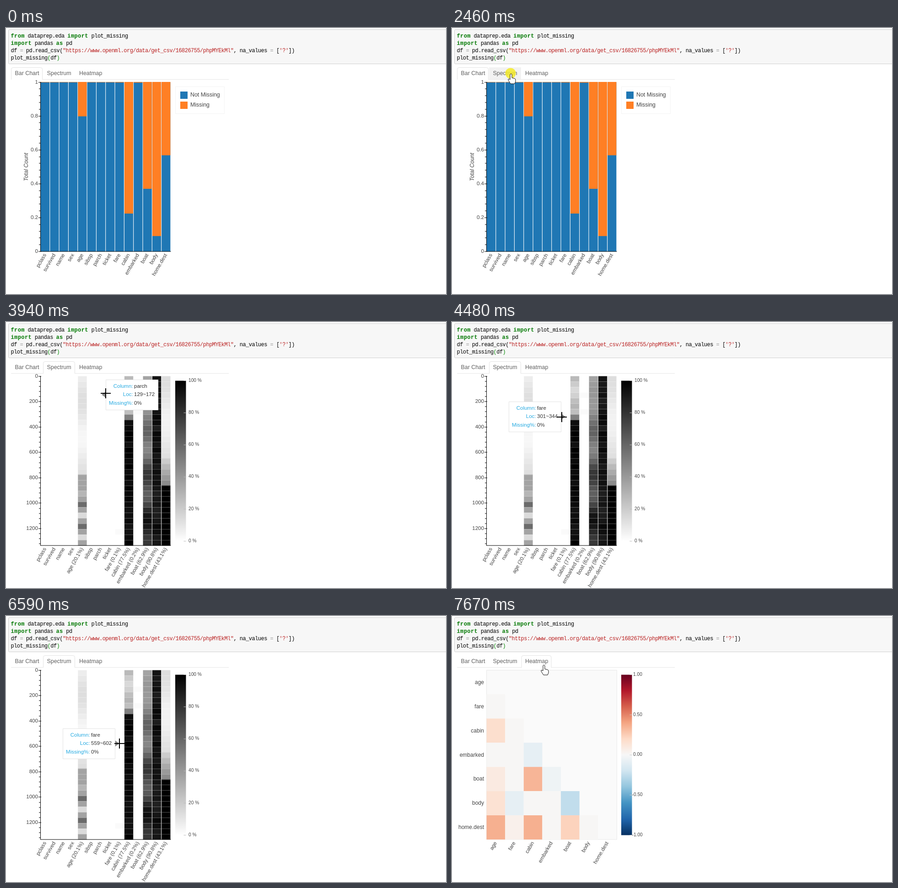
Recreate the animation shown at these times as an HTML page with a canvas. Size 962 by 582 pixels, loop 8000 ms.

```html
<!DOCTYPE html>
<html lang="en">
<head>
<meta charset="utf-8">
<title>Missing values</title>
<style>
html, body { margin: 0; width: 100%; height: 100%; overflow: hidden; background: #fff; }
canvas { display: block; }
</style>
</head>
<body>
<canvas id="stage" width="962" height="582"></canvas>
<script>
const ctx = document.getElementById('stage').getContext('2d');
const LOOP = 8000;
const SANS = '"Liberation Sans", Arial, sans-serif', MONO = '"Liberation Mono", monospace';
const BLUE = '#1f77b4', ORANGE = '#ff7f24';
const PLOT = { x: 75.5, y: 118.5, w: 284.5, h: 370.5 };
const BINS = 31, BIN_SIZE = 43;
const colW = PLOT.w / 14, binH = PLOT.h / BINS;

const columns = ['pclass', 'survived', 'name', 'sex', 'age', 'sibsp', 'parch', 'ticket',
  'fare', 'cabin', 'embarked', 'boat', 'body', 'home.dest'];
const missing = { age: 20.1, fare: 0.1, cabin: 77.5, embarked: 0.2, boat: 62.9, body: 90.8, 'home.dest': 43.1 };

// Percentage missing in each bin of a column
const noise = n => { const v = Math.sin(n * 12.9898) * 43758.5453; return v - Math.floor(v); };
const clamp = v => Math.max(0, Math.min(1, v));
const density = {
  age: i => i < 18 ? 8 + 5 * Math.cos((i - 4) * 0.45)
    : 36 + 22 * Math.cos((i - 23) * Math.PI / 2) * clamp((i - 20) / 3),
  boat: i => 36 + 1.8 * i + Math.min(i, 12) * Math.cos((i - 9) * 0.757),
  cabin: i => i < 7 ? 22 + 7 * Math.cos((i - 5) * 1.1) : i < 8 ? 50 : 92 + 8 * noise(i),
  body: i => 87 + 10 * noise(i + 3),
  'home.dest': i => i < 20 ? 9 + 4 * Math.cos(i * 0.4) + 7 * Math.max(0, i - 14) : 100,
  fare: i => i === 28 ? 2 : 0,
  embarked: i => i === 3 || i === 6 ? 2 : 0
};

// Notable correlations; all other pairs are close to zero
const heatNames = ['age', 'fare', 'cabin', 'embarked', 'boat', 'body', 'home.dest'];
const correlation = {
  cabin: { age: 0.17 },
  embarked: { cabin: -0.09 },
  boat: { age: 0.09, cabin: 0.34, embarked: -0.05 },
  body: { age: 0.15, fare: -0.09, boat: -0.25 },
  'home.dest': { age: 0.36, fare: 0.05, cabin: 0.36, boat: 0.23 }
};
const RDBU = ['#67001f', '#b2182b', '#d6604d', '#f4a582', '#fddbc7', '#f7f7f7',
  '#d1e5f0', '#92c5de', '#4393c3', '#2166ac', '#053061'];

function heatColor(v) {
  const pos = 5 - 5 * v, i = Math.floor(pos);
  return `color-mix(in srgb, ${RDBU[i + 1]} ${(pos - i) * 100}%, ${RDBU[i]})`;
}

const tabs = [['Bar Chart', 11, 69], ['Spectrum', 81, 70], ['Heatmap', 151.5, 66]];

// Pointer moves: start, end, number of steps, from, to, ease-out power
const moves = [
  [70, 840, 11, [900, 560], [296, 34], 1.5],
  [910, 1390, 7, [310, 60], [270, 160]],
  [1850, 2460, 9, [260, 156], [129, 100]],
  [3330, 3715, 6, [146, 104], [210, 128]],
  [3792, 4100, 5, [214, 146], [229, 184]],
  [4170, 4940, 11, [230, 189], [246, 220], 1.85],
  [5260, 6050, 11, [248, 221], [248, 250]],
  [6130, 6590, 7, [248, 253], [248, 279]],
  [6740, 7047, 5, [246, 266], [222, 141]],
  [7123, 7430, 5, [213, 124], [201, 107]]
];

function pointerAt(t) {
  const move = moves.filter(m => m[0] <= t).pop();
  if (!move) return null;
  const [start, end, steps, from, to, power = 1] = move;
  const step = Math.min(steps - 1, Math.floor((t - start + 1) / (end - start) * (steps - 1)));
  const f = 1 - (1 - step / (steps - 1)) ** power;
  return { x: from[0] + (to[0] - from[0]) * f, y: from[1] + (to[1] - from[1]) * f };
}

function rect(x, y, w, h, fill) { ctx.fillStyle = fill; ctx.fillRect(x, y, w, h); }

function frame(x, y, w, h, color, fill, radius = 0) {
  ctx.beginPath();
  ctx.roundRect(x, y, w, h, radius);
  if (fill) { ctx.fillStyle = fill; ctx.fill(); }
  ctx.strokeStyle = color;
  ctx.lineWidth = 1;
  ctx.stroke();
}

function text(s, x, y, size = 11.6, { color = '#444', align = 'left', angle = 0, style = '' } = {}) {
  ctx.save();
  ctx.translate(x, y);
  ctx.rotate(angle);
  ctx.font = `${style} ${size}px ${SANS}`;
  ctx.textAlign = align;
  ctx.fillStyle = color;
  ctx.fillText(s, 0, 0.5);
  ctx.restore();
}

function codeLine(y, ...parts) {
  let x = 10.5;
  for (const [s, color = '#000', bold] of parts) {
    ctx.font = `${bold ? 'bold ' : ''}12px ${MONO}`;
    ctx.letterSpacing = bold ? '0.4px' : '-0.53px';
    ctx.fillStyle = color;
    ctx.fillText(s, x, y);
    x += ctx.measureText(s).width;
  }
  ctx.letterSpacing = '0px';
}

function drawCode() {
  const key = s => [s, '#007800', true], op = ['=', '#999'], str = s => [s, '#ba2121'];
  frame(5.5, 3.5, 970, 75, '#cfcfcf', '#f7f7f7', 2);
  codeLine(17.5, key('from'), [' dataprep.eda '], key('import'), [' plot_missing']);
  codeLine(33.5, key('import'), [' pandas '], key('as'), [' pd']);
  codeLine(49.5, ['df '], op, [' pd.read_csv('],
    str('"https://www.openml.org/data/get_csv/16826755/phpMYEkMl"'),
    [', na_values '], op, [' ['], str("'?'"), ['])']);
  codeLine(66, ['plot_missing'], ['(', '#008800'], ['df'], [')', '#008800']);
}

function drawTabs(active, pointer) {
  rect(11, 112, 476, 1, '#e6e6e6');
  tabs.forEach(([name, x, w], i) => {
    const hover = pointer && pointer.y > 86 && pointer.y < 113 && pointer.x > x && pointer.x < x + w;
    if (i === active) {
      frame(x + 0.5, 86.5, w - 1, 26, '#e2e2e2', '#fff', [4, 4, 0, 0]);
      rect(x + 1, 112, w - 2, 1, '#fff');
    } else if (hover) rect(x, 86, w, 26, '#f2f2f2');
    text(name, x + 8.5, 99.5, 12.4, { color: '#5f5f5f' });
  });
}

function drawAxes(max, step, labels, flip) {
  const yAt = v => PLOT.y + PLOT.h * (flip ? v / max : 1 - v / max);
  rect(75, 118, 1, 371, '#000');
  rect(75, 488.5, 285.5, 1, '#000');
  for (let k = 0; k * step / 5 <= max + 1e-9; k++) {
    const y = Math.round(yAt(k * step / 5)), major = k % 5 === 0;
    rect(major ? 71 : 72, y - 0.5, major ? 6 : 3, 1, '#000');
    if (major) text(String(+(k * step / 5).toFixed(1)), 70, y - 0.5, 11.6, { align: 'right' });
  }
  bottomLabels(labels);
}

function bottomLabels(labels) {
  const w = PLOT.w / labels.length;
  labels.forEach((s, i) =>
    text(s, PLOT.x + w * (i + 0.5) - 0.5, 494.5, 11.6, { align: 'right', angle: -Math.PI / 3 }));
}

function drawBars() {
  columns.forEach((name, i) => {
    const x = PLOT.x + i * colW + 0.5, w = colW - 1.1, h = PLOT.h * (missing[name] || 0) / 100;
    rect(x, PLOT.y, w, PLOT.h, BLUE);
    rect(x, PLOT.y - 0.5, w, h + 0.8, ORANGE);
  });
  drawAxes(1, 0.2, columns);
  text('Total Count', 44, 304, 12.2, { align: 'center', angle: -Math.PI / 2, style: 'italic' });
  frame(370.5, 128.5, 107, 59, '#f3f3f3');
  [['Not Missing', BLUE], ['Missing', ORANGE]].forEach(([s, color], i) => {
    rect(381, 139 + 22 * i, 16, 16, color);
    text(s, 403, 146.5 + 22 * i, 12.4);
  });
}

function colorBar(colors, labels, x, tick) {
  const g = ctx.createLinearGradient(0, 128, 0, 479.5);
  colors.forEach((c, i) => g.addColorStop(i / (colors.length - 1), c));
  rect(370, 128.5, 23.5, 351, g);
  labels.forEach((s, i) => {
    const y = 128 + 351 * i / (labels.length - 1);
    rect(388.5, y, 5, 1, tick);
    text(s, x - (s[0] === '-' ? 2.5 : 0), y - 0.5, 10.2);
  });
}

function drawSpectrum() {
  columns.forEach((name, c) => {
    if (!density[name]) return;
    const x = PLOT.x + c * colW + 0.5;
    for (let i = 0; i < BINS; i++) {
      const v = Math.round(255 * (1 - density[name](i) / 100)), y = PLOT.y + i * binH;
      rect(x, y, colW - 1, binH + 0.3, `rgb(${v},${v},${v})`);
      if (i) rect(x, Math.round(y), colW - 1, 1, 'rgba(255,255,255,0.25)');
    }
  });
  drawAxes(BINS * BIN_SIZE, 200, columns.map(n => missing[n] ? `${n} (${missing[n]}%)` : n), true);
  colorBar(['#000', '#fff'], [100, 80, 60, 40, 20, 0].map(v => v + ' %'), 399, '#bbb');
}

function drawHeatmap() {
  const w = PLOT.w / 7, h = PLOT.h / 7;
  frame(75.5, 118.5, 285, 370.5, '#e8e8e8', '#fafafa');
  heatNames.forEach((name, r) => {
    for (let c = 0; c < r; c++)
      rect(PLOT.x + c * w, PLOT.y + r * h, w, h, heatColor(correlation[name]?.[heatNames[c]] ?? 0.01));
    text(name, 70, PLOT.y + (r + 0.5) * h, 12, { align: 'right' });
  });
  bottomLabels(heatNames);
  colorBar(RDBU, ['1.00', '0.50', '0.00', '-0.50', '-1.00'], 396, '#ccc');
}

const overPlot = p => p.x >= PLOT.x && p.x < 360 && p.y > 118 && p.y < 489;

function drawTooltip(p) {
  const col = Math.floor((p.x - PLOT.x) / colW);
  const bin = Math.max(0, Math.floor((p.y + 1.5 - PLOT.y) / binH));
  const name = columns[col], share = density[name] ? Math.round(density[name](bin)) : 0;
  const rows = [['Column:', name], ['Loc:', `${bin * BIN_SIZE}~${(bin + 1) * BIN_SIZE}`], ['Missing%:', share + '%']];
  ctx.font = `11.5px ${SANS}`;
  const w = 70 + Math.max(...rows.map(r => ctx.measureText(r[1]).width));
  const cx = PLOT.x + (col + 0.5) * colW + 0.5, cy = Math.round(PLOT.y + (bin + 0.5) * binH - 1);
  const onLeft = cx > PLOT.x + PLOT.w / 2, side = onLeft ? -1 : 1;
  const x = Math.round(onLeft ? cx - 10 - w : cx + 10);
  frame(x + 0.5, cy - 33 + 0.5, w - 1, 66, '#e3e3e3', '#fff');
  const edge = cx + side * 10;
  ctx.fillStyle = '#888';
  ctx.beginPath();
  ctx.moveTo(edge, cy - 6.5);
  ctx.lineTo(edge - side * 9, cy);
  ctx.lineTo(edge, cy + 6.5);
  ctx.fill();
  rows.forEach(([label, value], i) => {
    const y = cy - 18.5 + 18.2 * i;
    text(label, x + 59.5, y, 11.5, { color: '#26aae1', align: 'right' });
    text(value, x + 62, y, 11.5, { color: '#333' });
  });
}

const HAND = new Path2D('M-2 2Q0 -2 2 2V9L8 10.5Q10 11 10 14V17L8 22H-1L-6 14Q-7 11 -4 11.5L-2 13Z');
const ARROW = new Path2D('M0 0V16L4 12.5L6.5 18L9 17L6.5 11.5H11.5Z');

function drawPointer(p) {
  const x = Math.round(p.x), y = Math.round(p.y);
  if (overPlot(p)) {
    rect(x - 11, y - 1, 22, 2, '#000');
    rect(x - 1, y - 11, 2, 22, '#000');
  } else if (p.y < 78) {
    rect(x - 0.5, y - 8, 1, 16, '#000');
    rect(x - 3, y - 8, 6, 1, '#000');
    rect(x - 3, y + 7, 6, 1, '#000');
  } else {
    const shape = p.y < 113 && p.x > 11 && p.x < 218 ? HAND : ARROW;
    ctx.save();
    ctx.translate(x, y);
    ctx.fillStyle = '#fff';
    ctx.strokeStyle = '#111';
    ctx.lineWidth = 1;
    ctx.fill(shape);
    ctx.stroke(shape);
    ctx.restore();
  }
}

function draw(now) {
  const t = now % LOOP, pointer = pointerAt(t);
  const view = t < 2630 ? 0 : t < 7670 ? 1 : 2;
  ctx.textBaseline = 'middle';
  ctx.textAlign = 'left';
  rect(0, 0, 962, 582, '#fff');
  drawCode();
  drawTabs(view, pointer);
  [drawBars, drawSpectrum, drawHeatmap][view]();
  if (pointer) {
    if (view === 1 && overPlot(pointer)) drawTooltip(pointer);
    if ((t >= 2460 && t < 2630) || (t >= 7580 && t < 7670)) {
      ctx.fillStyle = 'rgba(245,235,40,0.85)';
      ctx.beginPath();
      ctx.arc(pointer.x - 1, pointer.y - 1, 11.5, 0, Math.PI * 2);
      ctx.fill();
    }
    drawPointer(pointer);
  }
  requestAnimationFrame(draw);
}
requestAnimationFrame(draw);
</script>
</body>
</html>
```
